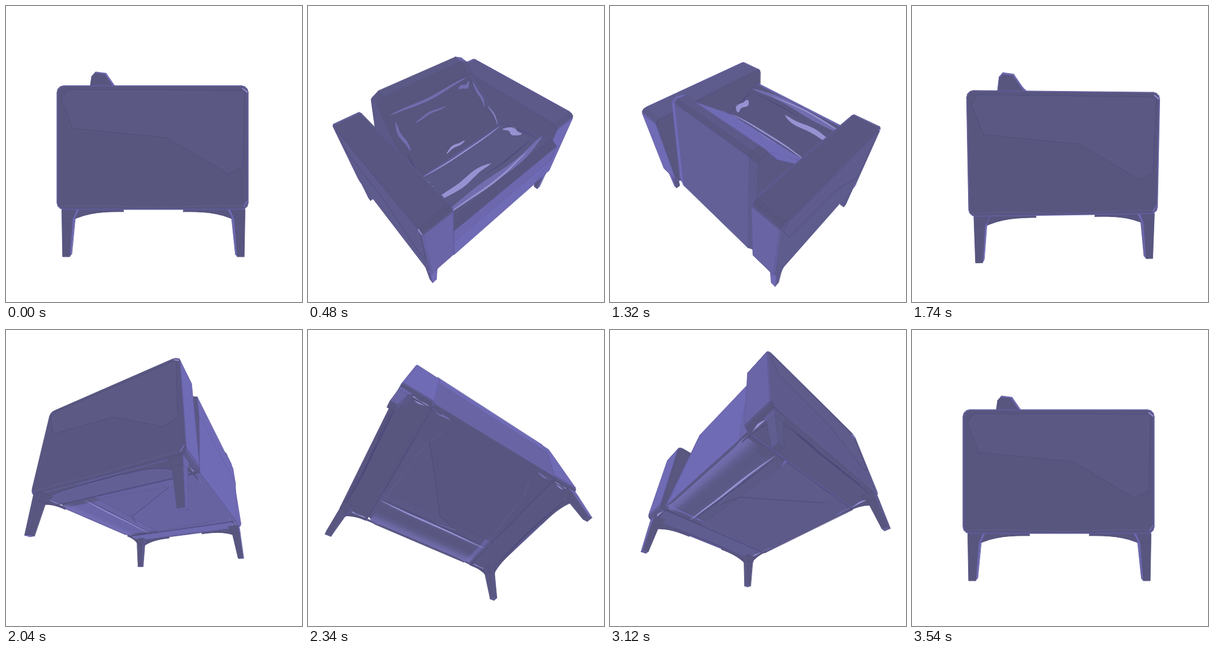
An HTML page with a canvas that plays this animation: 512x512 px, repeating every 3.6 s.

```html
<!DOCTYPE html>
<html lang="en">
<head>
<meta charset="utf-8">
<title>Armchair turntable</title>
<style>
html, body { margin: 0; width: 100%; height: 100%; overflow: hidden; background: #fff; }
canvas { display: block; width: 512px; height: 512px; }
</style>
</head>
<body>
<canvas id="stage" width="512" height="512"></canvas>
<script>
const ctx = document.getElementById('stage').getContext('2d');
ctx.lineJoin = ctx.lineCap = 'round';
const DIST = 443, FOCAL = 446, STEP = 60, STEPS = 60;
const FLOOR = -65, FOOT = -120, ARM_TOP = 80;
const BASE = [88, 86, 127], RIM = [142, 133, 247];
const LIGHT = '#716dae', PALE = '#9692d2', DARK = '#4c4979', SOFT = '#615e90';

const dot = (a, b) => a[0] * b[0] + a[1] * b[1] + a[2] * b[2];
const sub = (a, b) => a.map((v, i) => v - b[i]);
const cross = (a, b) => [a[1] * b[2] - a[2] * b[1], a[2] * b[0] - a[0] * b[2], a[0] * b[1] - a[1] * b[0]];
const unit = a => a.map(v => v / Math.hypot(...a));
const mean = pts => pts[0].map((_, i) => pts.reduce((s, p) => s + p[i], 0) / pts.length);
const clamp = v => Math.min(1, Math.max(0, v));
const range = (n, fn) => Array.from({ length: n + 1 }, (_, i) => fn(i / n));

// Convex solid from rings of equal length, closed at both ends.
function solid(rings) {
  const centre = mean(rings.flat());
  const faces = [rings[0], rings[rings.length - 1]];
  for (let r = 1; r < rings.length; r++) {
    rings[r].forEach((p, i) => {
      const j = (i + 1) % rings[r].length;
      faces.push([p, rings[r][j], rings[r - 1][j], rings[r - 1][i]]);
    });
  }
  return faces.map(pts => {
    const mid = mean(pts);
    let normal = unit(cross(sub(pts[1], pts[0]), sub(pts[2], pts[0])));
    if (dot(normal, sub(mid, centre)) < 0) normal = normal.map(v => -v);
    return { pts, mid, normal };
  });
}

// Extrudes a [z, y] profile along x; the half width may vary over the profile.
function extrude(profile, cx, half, bevel, shrink) {
  const [cz, cy] = mean(profile);
  return solid([-1, bevel - 1, 1 - bevel, 1].map(k => profile.map(([z, y]) => {
    const s = Math.abs(k) === 1 ? shrink : 1;
    return [cx + k * half(z, y), cy + (y - cy) * s, cz + (z - cz) * s];
  })));
}

function roundRect(z0, z1, y0, y1, r) {
  return [0, 1, 2, 3].flatMap(corner => range(3, t => {
    const a = (corner + t) * Math.PI / 2;
    const z = corner === 0 || corner === 3 ? z1 - r : z0 + r;
    const y = corner < 2 ? y1 - r : y0 + r;
    return [z + r * Math.cos(a), y + r * Math.sin(a)];
  }));
}

const seatHeight = z => 28 + .22 * (z - 20);
const seatHalf = (z, y) => y < 0 ? 99 : 92 + 14 * clamp((z - 20) / 86);
const backHalf = (z, y) => 99 - 15 * clamp(y / 119);

const [leftArm, rightArm] = [-1, 1].map(s =>
  extrude(roundRect(-113, 111, FLOOR, ARM_TOP, 8), s * 121, () => 22, .08, .985));
const seat = extrude([[-40, FLOOR], [20, 28], [106, 47], [118, 40], [118, 8], [110, FLOOR]], 0, seatHalf, .01, .995);
const back = extrude([[-88, 112], [-83, 118], [-68, 116], [-55, 97], [20, 28], [-40, FLOOR], [-108, FLOOR]],
  0, backHalf, .14, .93);

const legs = [-1, 1].flatMap(sx => [-1, 1].map(sz => {
  const box = solid([0, .2, 1].map(t => {
    const flare = (1 - t) ** 4, y = FLOOR + (FOOT - FLOOR) * t;
    const xs = [134 - 9 * flare, 142], zs = [98 - 8 * flare, 107 - t];
    return [[0, 0], [1, 0], [1, 1], [0, 1]].map(([i, j]) => [sx * xs[i], y, sz * zs[j]]);
  }));
  const arch = range(8, t => [t, FLOOR - 3 - 11 * (1 - t) ** 3]);
  const rail = place => [place(1, FLOOR), place(0, FLOOR), ...arch.map(p => place(...p))];
  return {
    box,
    rails: [
      rail((t, y) => [sx * 139, y, sz * (98 - 63 * t)]),
      rail((t, y) => [sx * (134 - 48 * t), y, sz * 104])
    ]
  };
}));

let right, up, toward, eye;
function aim(a) {
  const s = Math.sin(a), c = Math.cos(a);
  const flip = Math.cos(a - .03) < 0 ? -1 : 1;
  right = [s * flip, 0, c * flip];
  up = [s * c * flip, c * flip, -s * s * flip];
  toward = [-c * c, s, s * c];
  eye = toward.map(v => v * DIST);
}
function project(p) {
  const k = FOCAL / (DIST - dot(p, toward));
  return [255 + k * dot(p, right), 256 - k * dot(p, up)];
}

function trace(pts) {
  ctx.beginPath();
  pts.forEach(p => ctx.lineTo(...project(p)));
}
function fill(pts, color) {
  trace(pts);
  ctx.closePath();
  ctx.fillStyle = color;
  ctx.fill();
}
function line(pts, color, width = 1) {
  trace(pts);
  ctx.strokeStyle = color;
  ctx.lineWidth = width;
  ctx.stroke();
}

// A cloth fold: a bowed, rippled lens from u0 to u1 on a mapped surface.
function fold(map, u0, u1, v, bow, width, color) {
  const edge = side => range(16, t => {
    const swell = Math.sin(Math.PI * t);
    const ripple = .2 * width * Math.sin(9 * t + u0);
    return map(u0 + (u1 - u0) * t, v + bow * swell + ripple + side * width / 2 * Math.sqrt(swell));
  });
  fill([...edge(-1), ...edge(1).reverse()], color);
}

function drawSolid(faces) {
  for (const { pts, mid, normal } of faces) {
    const view = sub(eye, mid);
    const facing = dot(normal, unit(view));
    if (facing <= 0) continue;
    const amount = Math.min(.45, (1 - facing) ** 3) * (Math.abs(normal[0]) > .8 ? .25 : 1);
    const color = 'rgb(' + BASE.map((v, i) => Math.round(v + (RIM[i] - v) * amount)) + ')';
    fill(pts, color);
    ctx.lineWidth = .8;
    for (ctx.strokeStyle of [color, 'rgba(66,62,112,.22)']) ctx.stroke();
  }
}

const onSide = (z, y) => [-143, y, z];
const onSeat = (x, z) => [x, seatHeight(z), z];
const onBack = (x, q) => [x, 97 - .69 * q, -55 + .75 * q];
const under = (x, z) => [x, FLOOR, z];
const across = map => (u, v) => map(v, u);
const path = (map, pts) => pts.map(p => map(...p));

function sideDetails() {
  if (eye[0] > -150) return;
  const crease = [[-107, 64], [-94, 30], [16, 19], [87, -23], [104, -15]];
  fill(path(onSide, [...crease, [106, 74], [-100, 75]]), 'rgba(97,94,142,.35)');
  line(path(onSide, [...crease, [106, 74], [-100, 75], [-107, 64]]), '#504d7b');
  line(range(12, t => onSide(-108 + 216 * t, FLOOR + 4 + Math.sin(9 * t))), SOFT);
  line(path(onSide, [[104, 76], [109, 72]]), PALE, 2);
  line(path(onSide, [[105, -61], [109, -55]]), LIGHT, 2);
}

function seatDetails() {
  if (eye[1] < 60) return;
  fold(onSeat, -103, 5, 74, -2, 10, PALE);
  fold(onSeat, -105, 105, 93, 6, 10, LIGHT);
  fold(onSeat, -104, 60, 97, 5, 3, PALE);
  fold(onSeat, -88, 88, 20, 5, 3, PALE);
  fold(onSeat, -20, 85, 84, 2, 2, DARK);
  for (const s of [-1, 1]) {
    fold(across(onSeat), 30, 56 + s * 8, s * 84, s * 3, 12 + s * 3, PALE);
    fold(across(onSeat), 26, 92, s * 92, s * 4, 2, DARK);
  }
}

function backDetails() {
  if (.69 * (eye[2] - 20) + .75 * (eye[1] - 28) < 0) return;
  fold(onBack, -78, 72, 3, 3, 4, LIGHT);
  fold(onBack, -50, 10, 28, -2, 3, LIGHT);
  fold(onBack, 46, 72, 12, 3, 7, LIGHT);
  fold(onBack, -30, 10, 90, -2, 4, PALE);
  for (const s of [-1, 1]) {
    fold(across(onBack), 14, 60, s * 76, s * 2, 5, LIGHT);
    fold(across(onBack), 60, 98, s * 82, s * 3, 2, s < 0 ? DARK : PALE);
  }
}

function bottomDetails() {
  if (eye[1] > FLOOR) return;
  const crease = [[31, -50], [-5, -38], [-38, 8], [-80, 64]];
  fill(path(under, [...crease, [-97, 60], [-97, -56]]), 'rgba(101,97,145,.18)');
  const bands = 14, front = -58, depth = 46;
  for (let i = 0; i < bands; i++) {
    const t = i / bands, z = front - depth * (1 - t), next = z + depth / bands + .2;
    const glow = .75 * Math.cos(Math.PI * clamp((t + .05) * .75)) ** 4;
    fill(path(under, [[94, z], [-94, z], [-94, next], [94, next]]), `rgba(122,117,188,${glow})`);
  }
  line(path(under, crease), DARK);
  line(range(10, t => under(31 - 110 * t, -50 - 11 * Math.sin(t * Math.PI / 2))), LIGHT);
  fold(under, -98, 98, -59, -1, 3, PALE);
  fold(under, -96, 96, -55, -1, 1.5, DARK);
  for (const s of [-1, 1]) {
    line(path(under, [[s * 99, -106], [s * 99, 106]]), DARK);
    line(path(under, [[s * 92, -56], [s * 82, 60], [s * 70, 89]]), SOFT);
    fold(across(under), -95, 94, s * 138, -s * 2, 2.5, DARK);
    for (const end of [-104, 103]) {
      fold(under, s * 132, s * 102, end, 0, 4, PALE);
      fold(under, s * 100, s * 72, end, 0, 2.5, LIGHT);
    }
  }
}

function drawLegs() {
  const far = leg => Math.hypot(...sub(eye, leg.box[0].mid));
  for (const { box, rails } of [...legs].sort((a, b) => far(b) - far(a))) {
    for (const rail of rails) {
      fill(rail, '#58567f');
      line(rail.slice(2), DARK);
    }
    drawSolid(box);
  }
}

function drawMiddle() {
  const parts = [[seat, seatDetails], [back, backDetails]];
  const seatNearer = 92 * (eye[2] + 40) - 60 * (eye[1] - FLOOR) > 0;
  if (seatNearer) parts.reverse();
  for (const [part, details] of parts) {
    drawSolid(part);
    details();
  }
}

// Parts are painted back to front by the planes that separate them.
function drawChair() {
  const below = eye[1] < FLOOR;
  if (!below) drawLegs();
  drawSolid(rightArm);
  if (eye[0] < -99) {
    drawMiddle();
    drawSolid(leftArm);
  } else {
    drawSolid(leftArm);
    drawMiddle();
  }
  sideDetails();
  if (below) {
    bottomDetails();
    drawLegs();
  }
}

const start = performance.now();
function frame() {
  const step = Math.floor(Math.max(0, performance.now() - start) / STEP) % STEPS;
  ctx.fillStyle = '#fff';
  ctx.fillRect(0, 0, 512, 512);
  aim(step / (STEPS - 1) * 2 * Math.PI);
  drawChair();
  requestAnimationFrame(frame);
}
frame();
</script>
</body>
</html>
```
